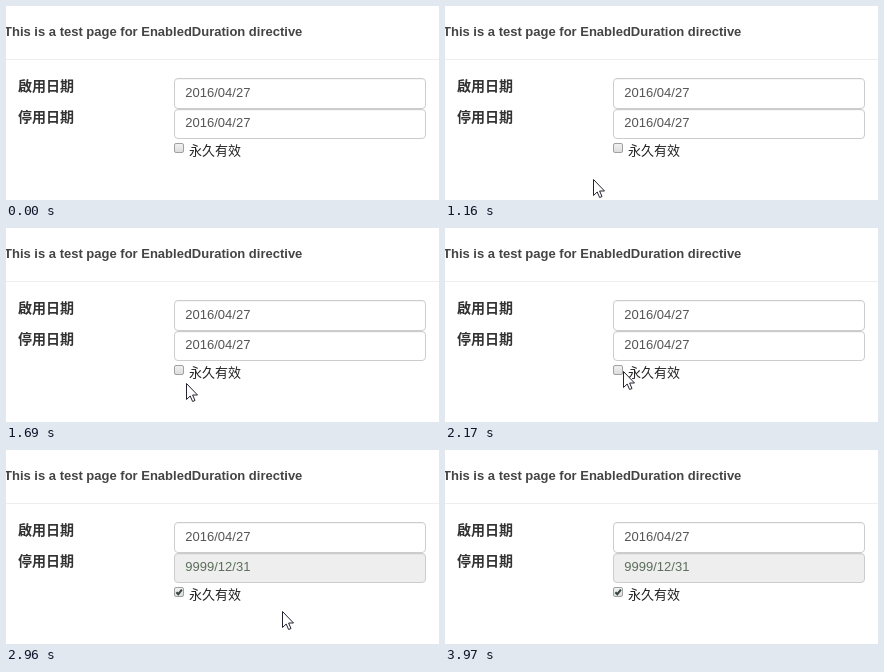
An HTML page for the animation above (4820 ms loop, 433x194 px).

```html
<!DOCTYPE html>
<html lang="zh-Hant">
<head>
<meta charset="utf-8">
<style>
  html, body { margin: 0; width: 100%; height: 100%; overflow: hidden; background: #fff; }
  svg { display: block; width: 433px; height: 194px; }
  text { font: 13px "Liberation Sans", Arial, sans-serif; fill: #555; }
  .title { font-weight: bold; fill: #444; }
  .label { font: bold 14px "Noto Sans CJK TC", "Noto Sans CJK", sans-serif; fill: #333; }
  .option { font: 13px "Noto Sans CJK TC", "Noto Sans CJK", sans-serif; fill: #222; }
  .field { fill: #fff; stroke: #ccc; }
  .shade { fill: none; stroke: #000; stroke-opacity: .04; }
  .off .field { fill: #eee; }
  .off text { fill: #5b6e5b; }
</style>
</head>
<body>
<svg viewBox="0 0 433 194">
  <defs>
    <linearGradient id="face" x2="0" y2="1">
      <stop offset="0" stop-color="#f2f2f2"/>
      <stop offset="1" stop-color="#dcdcdc"/>
    </linearGradient>
  </defs>
  <text class="title" x="-2" y="30">This is a test page for EnabledDuration directive</text>
  <path d="M0 53.5H433" stroke="#eee"/>
  <text class="label" x="12" y="85">啟用日期</text>
  <text class="label" x="12" y="116">停用日期</text>
  <g>
    <rect class="field" x="168.5" y="72.5" width="251" height="30" rx="3.5"/>
    <path class="shade" d="M171 73.5H417"/>
    <text x="179.3" y="91">2016/04/27</text>
  </g>
  <g id="end">
    <rect class="field" x="168.5" y="103.5" width="251" height="29" rx="3.5"/>
    <path class="shade" d="M171 104.5H417"/>
    <text id="endDate" x="179.3" y="121">2016/04/27</text>
  </g>
  <rect x="168.5" y="137.5" width="9" height="9" rx="1.5" fill="url(#face)" stroke="#a0a0a0"/>
  <path id="tick" d="M170.4 142.2L172.3 144.2L175.9 139.6" fill="none" stroke="#34463a" stroke-width="2"/>
  <text class="option" x="183" y="149">永久有效</text>
  <path id="cursor" d="M.5 .5V16.5L4.2 13L6.6 18.5L9 17.5L6.6 12H11.5Z" fill="#fff" stroke="#23232f"/>
</svg>
<script>
  const LOOP = 4820, CHECK_AT = 2490, STEP = 78;

  // The pointer rests at one point until the next glide begins.
  const home = { x: 138, y: 194 };
  const glides = [
    { from: 380, to: 520, x: 147, y: 173, power: 1 },
    { from: 1160, to: 1390, x: 159, y: 172, power: 2 },
    { from: 1540, to: 1690, x: 180, y: 155, power: 1 },
    { from: 1780, to: 2020, x: 179, y: 144, power: .5 },
    { from: 2170, to: 2170, x: 178, y: 143, power: 1 },
    { from: 2800, to: 3260, x: 326, y: 169, power: .49 },
    { from: 3340, to: 3420, x: 340, y: 169, power: 1 },
    { from: 3810, to: 3970, x: 368, y: 196, power: 1 }
  ];

  const byId = id => document.getElementById(id);
  const end = byId('end'), endDate = byId('endDate');
  const tick = byId('tick'), cursor = byId('cursor');

  const lerp = (a, b, p) => a + (b - a) * p;

  // Share of a glide done at time t, in even steps; the first is taken at once.
  function progress({ from, to, power }, t) {
    if (t >= to) return 1;
    const gaps = Math.round((to - from) / STEP);
    const taken = Math.floor((t - from) / (to - from) * gaps) + 1;
    return (taken / (gaps + 1)) ** power;
  }

  function pointerAt(t) {
    let { x, y } = home;
    for (const glide of glides) {
      if (t < glide.from) break;
      const p = progress(glide, t);
      x = lerp(x, glide.x, p);
      y = lerp(y, glide.y, p);
    }
    return [Math.ceil(x), Math.ceil(y)];
  }

  function draw(t) {
    const checked = t >= CHECK_AT;
    end.setAttribute('class', checked ? 'off' : '');
    endDate.textContent = checked ? '9999/12/31' : '2016/04/27';
    tick.setAttribute('visibility', checked ? 'visible' : 'hidden');
    cursor.setAttribute('transform', `translate(${pointerAt(t)})`);
  }

  const start = performance.now();
  function frame() {
    draw((performance.now() - start) % LOOP);
    requestAnimationFrame(frame);
  }
  frame();
</script>
</body>
</html>
```
